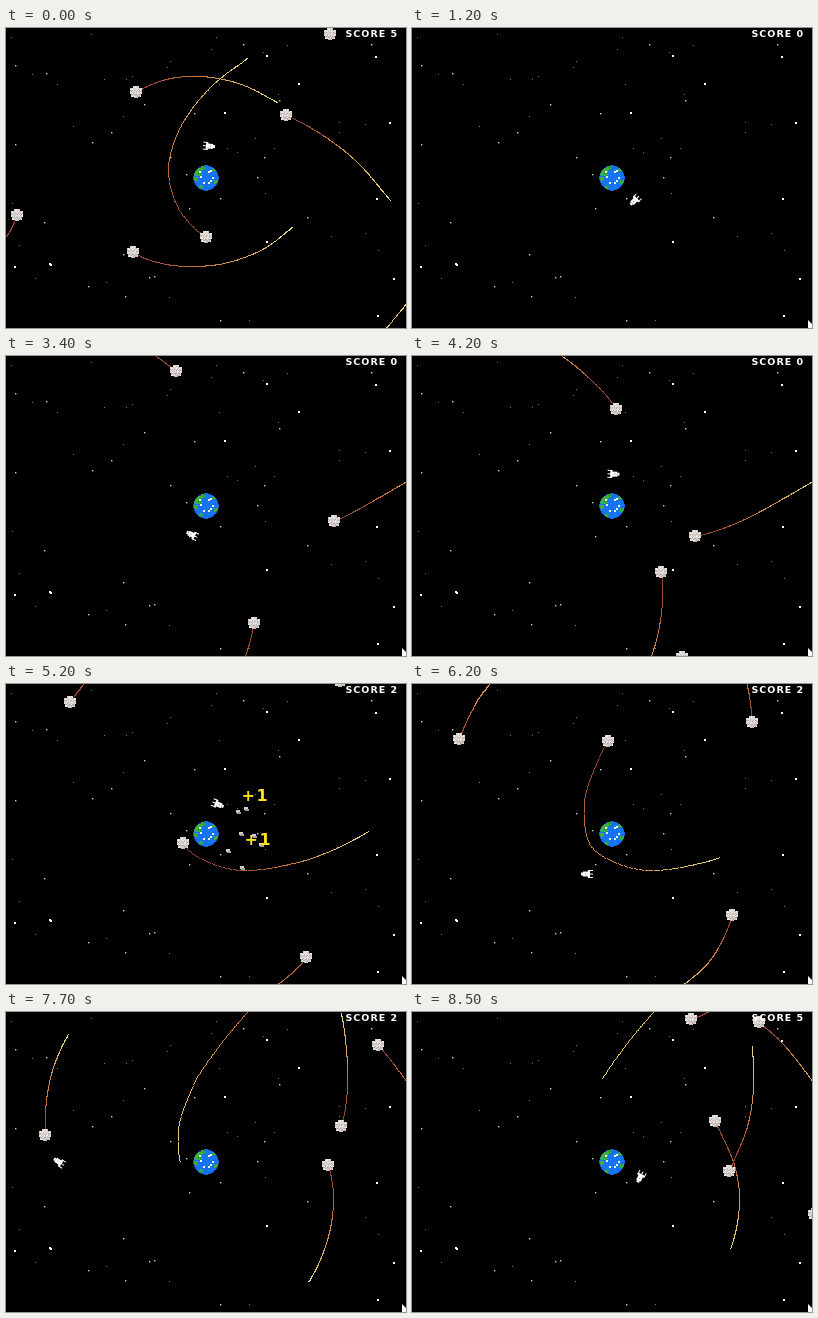
Animation of 400x300 px, one loop 8600 ms. Source, as an HTML page with a canvas:

```html
<!DOCTYPE html>
<html>
<head>
<meta charset="utf-8">
<style>
html, body { margin: 0; width: 100%; height: 100%; overflow: hidden; background: #000; }
#stage { position: relative; width: 400px; height: 300px; overflow: hidden; }
canvas { position: absolute; left: 0; top: 0; }
.text { position: absolute; white-space: pre; line-height: 1; font-family: "DejaVu Sans", sans-serif; font-weight: bold; }
#score { left: 339.5px; top: 1px; font-size: 9.5px; letter-spacing: 1px; color: #fff; }
.plus { font-size: 16px; letter-spacing: 1.5px; color: #ffe11c; }
</style>
</head>
<body>
<div id="stage">
  <canvas id="view" width="400" height="300"></canvas>
  <div id="score" class="text"></div>
</div>
<script>
const LOOP = 8600, STEP = 100, TRAIL = 2400, BURST_LIFE = 550, RESET = 900;
const stage = document.getElementById('stage');
const scoreBox = document.getElementById('score');
const ctx = document.getElementById('view').getContext('2d');
ctx.imageSmoothingEnabled = false;

// Smooth position at time t along keys [time, x, y]
function along(keys, t) {
  const last = keys.length - 1;
  let i = 0;
  while (i < last - 1 && t > keys[i + 1][0]) i++;
  const a = keys[i], b = keys[i + 1], span = b[0] - a[0];
  const u = (t - a[0]) / span;
  const slope = (k, axis) => {
    const p = keys[Math.max(k - 1, 0)], n = keys[Math.min(k + 1, last)];
    return (n[axis] - p[axis]) / (n[0] - p[0]) * span;
  };
  const h = u * u * (3 - 2 * u);
  return [1, 2].map(axis =>
    a[axis] + (b[axis] - a[axis]) * h +
    slope(i, axis) * u * (1 - u) * (1 - u) - slope(i + 1, axis) * u * u * (1 - u));
}

const rocks = [];
const rock = (end, ...keys) => rocks.push({ start: keys[0][0], end, keys });

rock(RESET, [-2400, 271, 74], [-1760, 235, 56], [-1100, 195, 48], [-530, 160, 51], [0, 130, 64], [900, 86, 97]);
rock(RESET, [-2400, 384, 172], [-1500, 350, 133], [-720, 315, 106], [0, 280, 87], [900, 234, 71]);
rock(RESET, [-2400, 241, 30], [-1800, 205, 58], [-1240, 175, 97], [-790, 162, 140], [-400, 172, 180], [0, 200, 209], [450, 240, 224], [900, 285, 218]);
rock(RESET, [-2400, 286, 199], [-1910, 258, 220], [-1360, 222, 234], [-870, 187, 238], [-420, 155, 235], [0, 127, 224], [900, 84, 186]);
rock(RESET, [-2400, -80, 300], [-400, 0, 208], [0, 11, 187], [900, 34, 140]);
rock(RESET, [-2400, 330, -120], [0, 324, 6], [900, 318, 58]);
rock(RESET, [-2400, 402, 273], [-1900, 380, 300], [0, 300, 400], [900, 260, 450]);

rock(LOOP, [1400, 432, 106], [2600, 373, 141], [3400, 328, 165], [4200, 283, 180], [4650, 236, 186], [4950, 200, 177],
  [5200, 177, 159], [5600, 172, 118], [5900, 181, 87], [6200, 196, 57], [6900, 241, 0], [8600, 360, -120]);
rock(4800, [1800, 90, -40], [2950, 150, 0], [3600, 178, 23], [4200, 204, 53], [4850, 232, 110]);
rock(4900, [1800, 222, 345], [2800, 239, 300], [3260, 246, 275], [3750, 250, 245], [4200, 249, 216], [4900, 243, 165]);
rock(LOOP, [3400, 240, 318], [4200, 270, 301], [5200, 300, 273], [6200, 320, 231], [7000, 327, 190], [7700, 322, 153], [8500, 303, 109]);
rock(7900, [3600, 110, -45], [4700, 77, 0], [5200, 64, 18], [6200, 47, 55], [6900, 40, 88], [7700, 39, 123], [8000, 41, 135]);
rock(LOOP, [4000, 318, -55], [5200, 334, -3], [6200, 340, 38], [7000, 341, 76], [7700, 335, 114], [8500, 317, 159]);
rock(LOOP, [6100, 430, 115], [6900, 400, 69], [7700, 372, 33], [8500, 347, 10]);
rock(LOOP, [7300, 340, -30], [8200, 295, 0], [8500, 279, 7]);
rock(LOOP, [8000, 425, 200], [8500, 402, 202]);

const bursts = [
  { at: 4800, x: 238, y: 130, label: [235.5, 125], chunks: [[5, -12], [-15, -5], [-8, 50], [25, 55]] },
  { at: 4900, x: 240, y: 165, label: [238.5, 167], chunks: [[50, -15], [-60, 7], [-13, 63]] },
  { at: 7900, x: 40, y: 132, label: [34, 127], chunks: [[40, -15], [-40, 7], [-13, 50]] },
];
for (const b of bursts) {
  b.el = stage.appendChild(document.createElement('div'));
  b.el.className = 'text plus';
  b.el.textContent = '+1';
}

const scores = [[0, 5], [1000, 0], [4800, 1], [4900, 2], [7900, 3], [8100, 5]];

// Ship: circles the planet, twice breaking away before it snaps back
const SPIN = 196;
const orbits = [[0, 0, -84.6], [900, 2600, -41], [4900, 5200, -68], [8000, 8500, 28]];
const flights = [
  { from: 4300, to: 4900, keys: [[4300, 212, 120], [4500, 231, 121], [4750, 245, 143], [4900, 242, 165]] },
  { from: 5950, to: 8000, keys: [[5950, 206, 181], [6200, 175, 190], [6950, 110, 180], [7700, 53, 150], [8000, 34, 132]] },
];
function shipAt(t) {
  const flight = flights.find(f => t >= f.from && t < f.to);
  if (flight) {
    const [x, y] = along(flight.keys, t), [nx, ny] = along(flight.keys, t + 20);
    return [x, y, Math.atan2(ny - y, nx - x)];
  }
  const [, ref, deg] = orbits.filter(o => t >= o[0]).pop();
  const a = (deg + SPIN * (t - ref) / 1000) * Math.PI / 180;
  return [200 + 32 * Math.cos(a), 150 + 32 * Math.sin(a), a + Math.PI / 2];
}

function hash(x, y) {
  const s = Math.sin(x * 12.99 + y * 78.23) * 43758.5;
  return s - Math.floor(s);
}

function sprite(size, colorAt) {
  const c = document.createElement('canvas');
  c.width = c.height = size;
  const g = c.getContext('2d'), mid = (size - 1) / 2;
  for (let y = 0; y < size; y++) for (let x = 0; x < size; x++) {
    const color = colorAt(x - mid, y - mid);
    if (color) { g.fillStyle = color; g.fillRect(x, y, 1, 1); }
  }
  return c;
}

const rockSprite = sprite(14, (x, y) => {
  const edge = 6.1 + 0.5 * Math.sin(Math.atan2(y, x) * 9);
  if (Math.hypot(x, y) > edge) return null;
  const n = hash(x, y);
  return n < 0.2 ? '#b5aaa6' : n < 0.7 ? '#d6cecb' : '#efebe8';
});

const land = [[-8, -6, 4.5], [-10, 1, 2.5], [10, 4, 2.5], [-3, -10, 2.5], [-5, 9, 2], [8, -8, 2]];
const clouds = [[3, -6], [5, -7], [-5, -1], [7, 0], [3, 5], [-2, 5], [5, 3], [-6, -6]];
const near = (list, x, y, r) => list.some(p => Math.hypot(x - p[0], y - p[1]) < (r || p[2]));
const planetSprite = sprite(26, (x, y) => {
  if (Math.hypot(x, y) > 12.7) return null;
  if (near(clouds, x, y, 1.2)) return '#eef4e6';
  if (near(land, x, y)) return hash(x, y) < 0.25 ? '#2f8f3c' : '#36b34a';
  return Math.hypot(x, y) > 11.8 ? '#1560c8' : '#1673f5';
});

const starGroups = [
  { size: 2, color: '#fff', at: [[8, 238], [43, 235], [44, 236], [260, 27], [292, 55], [369, 28], [383, 94], [370, 170], [260, 213], [371, 287], [218, 84], [387, 250]] },
  { size: 1.4, color: '#ccc', at: [[9, 37], [9, 116], [40, 45], [105, 104], [86, 114], [138, 76], [188, 85], [164, 129], [183, 180],
    [214, 170], [117, 226], [143, 249], [148, 248], [119, 268], [38, 194], [301, 189], [273, 72], [237, 16], [365, 16],
    [251, 149], [258, 129], [214, 292], [82, 258], [180, 146]] },
  { size: 1, color: '#777', at: [[5, 9], [85, 6], [26, 46], [51, 56], [67, 98], [98, 51], [120, 51], [126, 48], [161, 39], [164, 33],
    [205, 21], [210, 9], [213, 56], [272, 66], [257, 24], [281, 17], [325, 208], [359, 205], [333, 94], [333, 104],
    [359, 96], [249, 110], [221, 120], [231, 124], [259, 165], [6, 175], [13, 217], [29, 250], [100, 254], [163, 269],
    [243, 292], [372, 222], [117, 88], [268, 120]] },
];

function drawTrail(r, t) {
  for (let age = TRAIL; age > 0; age -= 10) {
    if (t - age < r.start) continue;
    const [x, y] = along(r.keys, t - age), k = age / TRAIL;
    ctx.fillStyle = `hsl(${8 + 42 * k}, ${48 + 20 * k}%, ${36 + 36 * k}%)`;
    ctx.fillRect(Math.round(x), Math.round(y), 1, 1);
  }
}

function drawShip(t) {
  const [x, y, heading] = shipAt(t);
  ctx.save();
  ctx.translate(x, y);
  ctx.rotate(heading);
  ctx.fillStyle = '#fff';
  ctx.fillRect(-3, -2.5, 7, 5);
  ctx.fillRect(4, -1.5, 2, 3);
  for (const fin of [-4, -0.5, 3]) ctx.fillRect(-6, fin, 4, 1);
  ctx.fillRect(-3, -4, 2, 8);
  ctx.fillStyle = '#777';
  ctx.fillRect(1, -0.5, 1, 1);
  ctx.restore();
}

function drawBurst(b, t) {
  const s = (t - b.at) / 1000, live = s >= 0 && s * 1000 < BURST_LIFE;
  b.el.style.display = live ? '' : 'none';
  if (!live) return;
  b.el.style.left = b.label[0] + 'px';
  b.el.style.top = b.label[1] - 20 * s - 13.5 + 'px';
  for (const [vx, vy] of b.chunks) {
    const x = Math.round(b.x + vx * s), y = Math.round(b.y + vy * s);
    ctx.fillStyle = '#d6cecb';
    ctx.fillRect(x - 2, y - 2, 4, 3);
    ctx.fillStyle = '#aaa09c';
    ctx.fillRect(x - 1, y, 4, 2);
  }
}

function drawCursor() {
  ctx.fillStyle = '#fff';
  ctx.beginPath();
  ctx.moveTo(396, 292);
  ctx.lineTo(396, 300);
  ctx.lineTo(400, 300);
  ctx.lineTo(400, 296);
  ctx.fill();
}

function draw(t) {
  ctx.fillStyle = '#000';
  ctx.fillRect(0, 0, 400, 300);
  for (const g of starGroups) {
    ctx.fillStyle = g.color;
    for (const [x, y] of g.at) ctx.fillRect(x, y, g.size, g.size);
  }
  const live = rocks.filter(r => t >= r.start && t < r.end);
  live.forEach(r => drawTrail(r, t));
  ctx.drawImage(planetSprite, 187, 137);
  for (const r of live) {
    const [x, y] = along(r.keys, t);
    ctx.drawImage(rockSprite, Math.round(x) - 7, Math.round(y) - 7);
  }
  bursts.forEach(b => drawBurst(b, t));
  drawShip(t);
  if (t >= RESET) drawCursor();
  scoreBox.textContent = 'SCORE ' + scores.filter(s => t >= s[0]).pop()[1];
}

const began = performance.now();
function tick() {
  const t = (performance.now() - began) % LOOP;
  draw(Math.floor(t / STEP) * STEP);
  requestAnimationFrame(tick);
}
tick();
</script>
</body>
</html>
```
